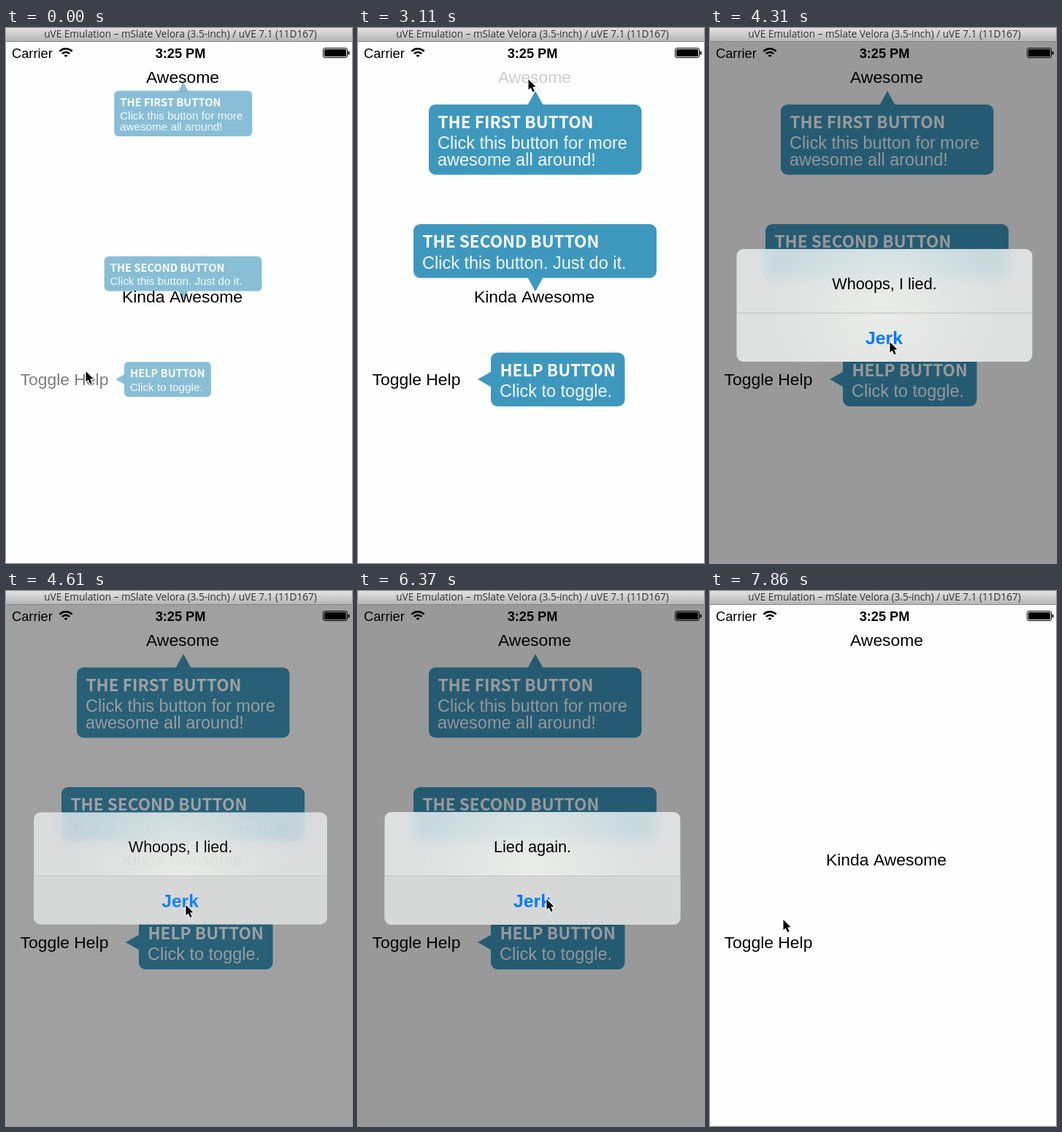
Recreate the animation shown at these times as an HTML page with a canvas. Size 474 by 731 pixels, loop 8000 ms.

```html
<!DOCTYPE html>
<html lang="en">
<head>
<meta charset="utf-8">
<title>Help bubbles</title>
<style>
  html, body { margin: 0; width: 100%; height: 100%; overflow: hidden; background: #fefefe; }
  canvas { display: block; }
</style>
</head>
<body>
<canvas id="stage" width="474" height="731"></canvas>
<script>
const ctx = document.getElementById('stage').getContext('2d');
const LOOP = 8000, STEP = LOOP / 54;
const SANS = '"Liberation Sans", Arial, sans-serif';
const HEAD = '"Noto Sans CJK JP", "Noto Sans CJK SC", "Noto Sans CJK", "Open Sans", sans-serif';
const BLUE = '#3e98be';

const mix = (a, b, p) => a + (b - a) * p;
const ease = p => p * p * (3 - 2 * p);
const ramp = (t, start, length) => ease(Math.min(1, Math.max(0, (t - start) / length)));

// box, arrow apex and the point the bubble grows out of
const tips = [
  { x: 97, y: 104.5, w: 291.5, h: 96, origin: [242.7, 51.5], arrow: [232.5, 105, 243, 86, 253.5, 105],
    title: 'THE FIRST BUTTON', lines: ['Click this button for more', 'awesome all around!'] },
  { x: 76, y: 268, w: 333, h: 73.5, origin: [242.7, 393], arrow: [232.5, 341, 243, 360, 253.5, 341],
    title: 'THE SECOND BUTTON', lines: ['Click this button. Just do it.'] },
  { x: 182, y: 443.5, w: 183.5, h: 73.5, origin: [125, 480], arrow: [182.5, 469.5, 164, 480, 182.5, 490.5],
    title: 'HELP BUTTON', lines: ['Click to toggle.'] }
];

// presses: [finger down, finger up]
const buttons = [
  { label: 'Awesome', x: 192, y: 75, presses: [[3100, 3450]] },
  { label: 'Kinda Awesome', x: 159, y: 375, presses: [[5300, 5560]] },
  { label: 'Toggle Help', x: 19.5, y: 488, presses: [[-400, -128], [700, 908], [7230, 7370]] }
];

const alerts = [
  { message: 'Whoops, I lied.', show: 3450, press: 4430, hide: 4530 },
  { message: 'Lied again.', show: 5560, press: 6340, hide: 6450 }
];

// time, x, y
const cursorPath = [
  [1640, 110, 470], [2510, 238, 41], [2810, 235, 81], [2960, 234, 71],
  [3700, 234, 71], [4300, 247, 430], [4600, 247, 430], [5030, 247, 372],
  [5600, 247, 372], [6360, 259, 422], [6600, 259, 422], [7200, 108, 470],
  [7560, 108, 470], [7850, 101, 450]
];

function text(str, x, y, font, color = '#000', align = 'left') {
  ctx.font = font;
  ctx.fillStyle = color;
  ctx.textAlign = align;
  ctx.fillText(str, x, y);
}

function polygon(points) {
  ctx.beginPath();
  for (let i = 0; i < points.length; i += 2) ctx.lineTo(points[i], points[i + 1]);
  ctx.closePath();
}

function roundRect(x, y, w, h, r) {
  ctx.beginPath();
  ctx.roundRect(x, y, w, h, r);
}

function scaleAbout(x, y, s) {
  ctx.translate(x, y);
  ctx.scale(s, s);
  ctx.translate(-x, -y);
}

function drawTitleBar() {
  const shade = ctx.createLinearGradient(0, 0, 0, 19);
  shade.addColorStop(0, '#e2e2e2');
  shade.addColorStop(1, '#b4b4b4');
  ctx.fillStyle = shade;
  ctx.fillRect(0, 0, 474, 19);
  ctx.fillStyle = '#858585';
  ctx.fillRect(0, 18, 474, 1);
  text('uVE Emulation – mSlate Velora (3.5-inch) / uVE 7.1 (11D167)', 239, 13,
    '13.6px "Open Sans", sans-serif', '#333', 'center');
}

function drawStatusBar() {
  text('Carrier', 8, 41, `18.3px ${SANS}`);
  text('3:25 PM', 239, 41, `bold 18.2px ${SANS}`, '#000', 'center');
  ctx.strokeStyle = ctx.fillStyle = '#000';
  ctx.lineWidth = 2.6;
  for (const r of [2, 7, 11.8]) {
    ctx.beginPath();
    ctx.arc(82, 40, r, -Math.PI * 0.76, -Math.PI * 0.24);
    ctx.stroke();
  }
  ctx.lineWidth = 1;
  roundRect(434.5, 27.5, 33, 13, 2.5);
  ctx.stroke();
  roundRect(436, 29, 30, 10, 1.5);
  ctx.fill();
  ctx.fillRect(468.5, 32, 2, 4.5);
}

function drawTip(tip, shown) {
  if (shown <= 0) return;
  ctx.save();
  scaleAbout(...tip.origin, mix(0.1, 1, shown));
  ctx.globalAlpha = shown;
  ctx.fillStyle = BLUE;
  roundRect(tip.x, tip.y, tip.w, tip.h, 9);
  ctx.fill();
  polygon(tip.arrow);
  ctx.fill();

  // white lettering on a white page stays white however faint the bubble is
  ctx.globalAlpha = 1;
  const left = tip.x + 12.5;
  text(tip.title, left, tip.y + 32, `bold 22.6px ${HEAD}`, '#fff');
  tip.lines.forEach((line, i) =>
    text(line, left - 0.5, tip.y + 60.7 + i * 22.7, `23.5px ${SANS}`, '#f4fafc'));
  ctx.restore();
}

function drawButton({ label, x, y, presses }, t) {
  const [down, up] = presses.filter(p => t >= p[0]).pop() || [-9999, -9999];
  ctx.globalAlpha = t < down ? 1 : mix(0.2, 1, ramp(t, up, 300));
  text(label, x, y, `22.9px ${SANS}`);
  ctx.globalAlpha = 1;
}

function alertState(alert, t) {
  const entering = ramp(t, alert.show, 400), leaving = ramp(t, alert.hide, 400);
  return { alpha: entering * (1 - leaving), scale: mix(1.2, 1, entering) - 0.12 * leaving };
}

function drawAlert(alert, t) {
  const { alpha, scale } = alertState(alert, t);
  if (alpha <= 0) return;
  ctx.save();
  ctx.globalAlpha = alpha;
  scaleAbout(239, 379, scale);
  roundRect(36.5, 302, 405, 154, 9);
  ctx.fillStyle = '#dfe1e1';
  ctx.fill();
  ctx.clip();

  // the bubble behind shows through, blurred
  ctx.filter = 'blur(9px)';
  ctx.fillStyle = 'rgba(120, 190, 215, .22)';
  ctx.fillRect(76, 268, 333, 73);
  ctx.filter = 'none';
  const glow = ctx.createRadialGradient(239, 380, 10, 239, 380, 150);
  glow.addColorStop(0, 'rgba(240, 242, 238, .6)');
  glow.addColorStop(1, 'rgba(240, 242, 238, 0)');
  ctx.fillStyle = glow;
  ctx.fillRect(36, 302, 406, 154);

  if (t >= alert.press) {
    ctx.fillStyle = '#d6d8d7';
    ctx.fillRect(36, 390, 406, 66);
  }
  ctx.fillStyle = '#bbc0c0';
  ctx.fillRect(36, 389, 406, 1);
  text(alert.message, 239, 357, `21.7px ${SANS}`, '#000', 'center');
  text('Jerk', 238.5, 432, `bold 24.8px ${SANS}`, '#007aff', 'center');
  ctx.restore();
}

function cursorAt(t) {
  const next = cursorPath.findIndex(k => k[0] > t);
  if (next === 0) return cursorPath[0].slice(1);
  if (next < 0) return cursorPath[cursorPath.length - 1].slice(1);
  const [t0, x0, y0] = cursorPath[next - 1], [t1, x1, y1] = cursorPath[next];
  const p = ramp(t, t0, t1 - t0);
  return [mix(x0, x1, p), mix(y0, y1, p)];
}

function drawCursor(t) {
  const [x, y] = cursorAt(t);
  ctx.save();
  ctx.translate(x - 0.5, y - 0.7);
  polygon([0, 0, 0, 14, 3.2, 11.2, 5.8, 17, 8.2, 16, 5.7, 10.3, 10, 10]);
  ctx.lineJoin = 'round';
  ctx.lineWidth = 2;
  ctx.strokeStyle = '#fff';
  ctx.stroke();
  ctx.fillStyle = '#000';
  ctx.fill();
  ctx.restore();
}

function draw(t) {
  ctx.fillStyle = '#fefefe';
  ctx.fillRect(0, 0, 474, 731);
  const shown = 1 - ramp(t, -128, 300) + ramp(t, 908, 300) - ramp(t, 7370, 300);
  tips.forEach(tip => drawTip(tip, shown));
  const dim = Math.max(...alerts.map(a => alertState(a, t).alpha));
  drawStatusBar();
  buttons.forEach(b => drawButton(b, t));
  ctx.fillStyle = `rgba(0, 0, 0, ${0.4 * dim})`;
  ctx.fillRect(0, 19, 474, 712);
  alerts.forEach(a => drawAlert(a, t));
  drawTitleBar();
  drawCursor(t);
}

const startTime = performance.now();
function tick() {
  const t = (performance.now() - startTime) % LOOP;
  draw(Math.floor((t + 4) / STEP) % 54 * STEP);
  requestAnimationFrame(tick);
}
tick();
</script>
</body>
</html>
```
